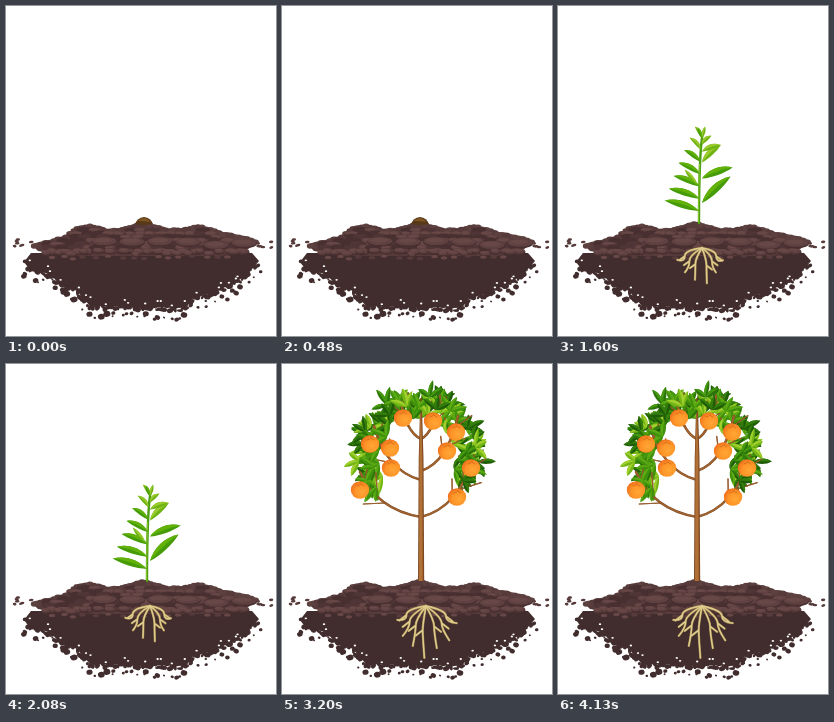
An HTML page that plays this animation: 270 by 330 pixels, repeating every 4.75 s.

```html
<!DOCTYPE html>
<html lang="en">
<head>
<meta charset="utf-8">
<title>Growing tree</title>
<style>
html, body { margin: 0; width: 100%; height: 100%; overflow: hidden; background: #fff; }
svg { display: block; width: 100%; height: 100%; }
.stage { visibility: hidden; animation: short 4750ms step-end infinite; }
#sprout { animation-delay: 800ms; }
#sapling { animation-delay: 1600ms; }
#bloom { animation-delay: 2400ms; }
#fruit { animation-name: long; animation-delay: 3200ms; }
@keyframes short { 0% { visibility: visible; } 16.8421%, 100% { visibility: hidden; } }
@keyframes long { 0% { visibility: visible; } 32.6316%, 100% { visibility: hidden; } }
</style>
</head>
<body>
<svg viewBox="0 0 270 330" preserveAspectRatio="none">
  <defs>
    <radialGradient id="peel" cx=".62" cy=".62" r=".65">
      <stop offset="0" stop-color="#ffa636"/>
      <stop offset=".6" stop-color="#fd9427"/>
      <stop offset="1" stop-color="#f0701c"/>
    </radialGradient>
  </defs>
  <g id="soil"></g>
  <g id="seed" class="stage"></g>
  <g id="sprout" class="stage"></g>
  <g id="sapling" class="stage"></g>
  <g id="bloom" class="stage"></g>
  <g id="fruit" class="stage"></g>
</svg>
<script>
let state = 11;
const rand = () => (state = state * 16807 % 2147483647) / 2147483647;
const between = (a, b) => a + (b - a) * rand();
const pick = list => list[Math.floor(rand() * list.length)];
const times = (n, make) => Array.from({ length: n }, (_, i) => make(i));
const rad = deg => deg * Math.PI / 180;
const fix = n => +n.toFixed(1);
const put = (id, ...parts) => { document.getElementById(id).innerHTML = parts.flat(3).join(''); };

const shape = (d, fill) => `<path d="${d}" fill="${fill}"/>`;
const line = (d, color, width) =>
  `<path d="${d}" fill="none" stroke="${color}" stroke-width="${width}" stroke-linecap="round"/>`;
const oval = (x, y, rx, ry, fill, turn = 0) =>
  `<ellipse rx="${fix(rx)}" ry="${fix(ry)}" fill="${fill}" transform="translate(${fix(x)} ${fix(y)}) rotate(${fix(turn)})"/>`;

// Height of a profile, given as [x, y] corners, at x
function height(profile, x) {
  const i = Math.max(1, profile.findIndex(p => p[0] >= x));
  const [[x0, y0], [x1, y1]] = [profile[i - 1], profile[i]];
  return y0 + (y1 - y0) * (x - x0) / (x1 - x0);
}

// Leaf pointing in a direction, lit on its upper half
function leaf(x, y, angle, len, width, [dark, light], bend = 0) {
  const a = fix(len * .3), b = fix(len * .7), l = fix(len), side = Math.cos(rad(angle)) < 0 ? 1 : -1;
  const curve = w => `C${a} ${fix(side * (w + bend))} ${b} ${fix(side * (w + bend))} ${l} 0`;
  const back = `C${b} ${fix(side * (bend - width))} ${a} ${fix(side * (bend - width))} 0 0`;
  const mid = `C${b} ${fix(side * bend)} ${a} ${fix(side * bend)} 0 0`;
  return `<g transform="translate(${fix(x)} ${fix(y)}) rotate(${fix(angle)})">` +
    shape('M0 0' + curve(width) + back, dark) + shape('M0 0' + curve(width) + mid, light) + '</g>';
}

function soil() {
  const deep = '#422d2e', mid = '#573b3b', light = '#684847', dim = '#482f30';
  const top = [[26, 239], [60, 230], [70, 221], [84, 219], [104, 224], [122, 221], [138, 216],
    [160, 223], [176, 223], [194, 219], [214, 226], [240, 231], [252, 236]];
  const base = [[18, 256], [24, 264], [44, 268], [56, 281], [70, 284], [84, 300], [180, 302],
    [187, 292], [208, 287], [240, 270], [253, 255]];
  const area = (profile, end, fill) => shape('M' + profile.join('L') + end + 'Z', fill);
  const out = [area(base, 'L246 247L25 247', deep)];

  for (let x = 19; x < 252; x += 2.5) {
    out.push(oval(x, height(base, x) + between(-2, 3), between(1.3, 3.6), between(1.3, 3.2), deep, between(0, 90)));
  }
  for (let x = 16; x < 253; x += 5.5) {
    const y = x < 19 ? 262 : height(base, x), r = 1 + 2.6 * rand() ** 1.5;
    out.push(oval(x + between(-3, 3), y + between(5, 13), r, r * .85, deep, between(-35, 35)));
    if (rand() < .5) out.push(oval(x + between(0, 5), y - between(2, 7), 1.2, .9, '#fff'));
  }
  for (const x of [14, 256]) {
    times(6, () => out.push(oval(x + between(-6, 12), between(233, 243), between(1.2, 2.8), 1.3, mid, between(-20, 20))));
  }

  out.push(area(top, 'L238 246L215 250L60 250L32 245', mid));
  for (let x = 28; x < 250; x += 4) {
    out.push(oval(x, height(top, x) + 1.5, between(3, 5), between(2, 3.2), pick([mid, mid, '#5d4040'])));
  }
  const clod = (x, y, rx, ry) => [oval(x, y + 1, rx, ry, dim), oval(x, y, rx - .5, ry - .5, '#5e4140'),
    oval(x - 1, y - .8, rx * .7, ry * .5, light)];
  for (let y = 224; y < 246; y += 3.5) {
    for (let x = 38 + between(0, 8); x < 240; x += between(8, 15)) {
      if (y < height(top, x) + 3) continue;
      const rx = between(5, 9), ry = between(2.2, 3.6);
      out.push(rand() < .45 ? oval(x, y, rx, ry, pick([dim, '#503536'])) : clod(x, y, rx, ry));
    }
  }
  for (let x = 98; x < 240; x += 28) out.push(clod(x, between(235, 239), 13, 4.5));
  for (let x = 40; x < 240; x += between(9, 15)) out.push(clod(x, between(244, 248), between(4, 7), 2.6));
  for (let x = 46; x < 235; x += between(8, 16)) out.push(oval(x, between(250, 253), 3.2, 1.6, pick([mid, light])));
  return out;
}

// Fan of roots that leave sideways and then dive
function roots(rx, ry, n) {
  const fan = times(n, i => {
    const a = rad(166 - 150 * i / (n - 1)), jitter = between(.85, 1.05);
    const x = 143 + rx * Math.cos(a) * jitter, y = 246 + ry * Math.sin(a) * jitter;
    const mx = 143 + (x - 143) * .6, my = 246 + (y - 246) * .4;
    const side = Math.sign(x - 143);
    return `M144 242Q${fix(mx + 2 * side)} ${fix(my - 5)} ${fix(mx + side * 2)} ${fix(my + 1)}T${fix(x)} ${fix(y)}` +
      `M${fix(mx + side * 2)} ${fix(my + 1)}l${fix(side * rx * .22)} ${fix(ry * .12)}`;
  });
  return [['#a08550', 2.3], ['#decd8d', 1.4]].map(([color, w]) => fan.map(d => line(d, color, w)));
}

const bark = '#a2642f', shade = '#7e4822';
const limb = (d, w) => line(d, shade, w) + line(d, bark, w * .65);

// Curved branch from the trunk to [ex, ey], with twigs on alternating sides
function branch(x, [y, ex, ey], width) {
  const dx = ex - x, dy = ey - y, cx = x + dx * .72, cy = y + dy * .16;
  const twigs = times(4, i => {
    const t = .48 + i * .13, u = 1 - t;
    const px = u * u * x + 2 * u * t * cx + t * t * ex, py = u * u * y + 2 * u * t * cy + t * t * ey;
    const a = Math.atan2(u * (cy - y) + t * (ey - cy), u * (cx - x) + t * (ex - cx)) + (i % 2 ? .75 : -.75);
    const len = between(.2, .3) * Math.hypot(dx, dy);
    return [px, py, px + len * Math.cos(a), py + len * Math.sin(a) - 2].map(fix);
  });
  const wood = limb(`M${x} ${y}Q${fix(cx)} ${fix(cy)} ${ex} ${ey}`, width) +
    twigs.map(([a, b, c, d]) => limb(`M${a} ${b}L${c} ${d}`, width * .5)).join('');
  return { wood, tips: [[ex, ey], ...twigs.map(t => t.slice(2))] };
}

const trunk = (x, fork, top) => shape(`M${x - 3} 217L${x - 2.3} ${fork}L${x - .7} ${top}h1.4L${x + 2.5} ${fork}L${x + 3.2} 217Z`, shade) +
  shape(`M${x - 2} 217L${x - 1.6} ${fork}L${x - .3} ${top}L${x + 1.4} ${fork}L${x + 1.7} 217Z`, '#b07036');

function flower([x, y], r) {
  const turn = between(0, 72);
  return times(5, i => {
    const a = turn + i * 72;
    return oval(x + Math.cos(rad(a)) * r * .58, y + Math.sin(rad(a)) * r * .58, r * .44, r * .3,
      pick(['#fb9e98', '#f48a87', '#fdb0a8']), a);
  }).join('') + oval(x, y, r * .26, r * .26, '#e25a5c');
}

// Small closed blossom on a dark calyx, with a young leaf
const bud = ([x, y]) => leaf(x, y + 3, between(-130, -50), 10, 2, ['#4d9c18', '#8bc72c']) +
  oval(x, y + 3, 1.7, 2, '#8c4937') + oval(x - 1.6, y, 2, 3.2, '#f48a87', -25) + oval(x + 1.6, y, 2, 3.2, '#fdb0a8', 25);

function bloom() {
  const limbs = [[178, 86, 128], [178, 194, 116], [146, 92, 97], [126, 185, 94], [117, 117, 78],
    [106, 164, 76], [96, 147, 64]].map(b => branch(141, b, 2));
  const tips = limbs.flatMap(b => b.tips);
  return [limbs.map(b => b.wood), trunk(141, 110, 72), tips.filter((_, i) => i % 5 > 2).map(bud),
    tips.filter((_, i) => i % 5 < 3).map(p => flower(p, between(6, 8)))];
}

// Sprays of leaves around the upper arc of the tree
function crown() {
  const tones = [['#1f5c08', '#347f0c'], ['#2c750a', '#459a10'], ['#3f900c', '#5cab14'], ['#74b516', '#a0d02c']];
  return times(72, i => {
    const a = 147 + 244 * (i * .618 % 1), r = Math.sqrt(between(.26, .74));
    const x = 136 + 69 * r * Math.cos(rad(a)), y = 94 + 74 * r * Math.sin(rad(a));
    const tone = pick(tones);
    return [-58, 48, -8].map(turn =>
      leaf(x, y, a + turn + between(-16, 16), between(13, 19), between(2.8, 3.8), tone, .8));
  });
}

const orange = ([x, y]) => oval(x, y, 9.2, 8.8, 'url(#peel)') +
  line(`M${x + 1} ${y - 6}q1 2 3 2m-3-2q-2 2-4 2`, '#cf651b', .7);

function fruit() {
  const limbs = [[153, 78, 108], [153, 192, 92], [116, 92, 62], [107, 176, 52], [75, 118, 34],
    [75, 158, 32]].map(b => branch(139, b, 2.5));
  const oranges = [[88, 80], [78, 126], [109, 104], [108, 84], [121, 54], [151, 57], [174, 68],
    [165, 87], [189, 104], [175, 133]];
  return [crown(), limbs.map(b => b.wood), trunk(139, 95, 34), crown().slice(0, 26), oranges.map(orange)];
}

function sapling() {
  const low = ['#459c08', '#62b20a'], high = ['#6fb313', '#9ccb30'];
  return [
    line('M141 217Q141 181 142 158T145 126', '#4a9c10', 2.4), line('M140.6 216Q140.6 181 141.5 158', '#8ac62c', 1),
    times(7, i => leaf(141 + i * .3, 205 - 12.3 * i, 197 + i * i * 1.2, 36 - 4 * i, 4.6 - i * .35, i < 5 ? low : high, 2)),
    times(5, i => leaf(144, 125 + 72 * .66 ** i, i % 2 ? -20 : -43, 39 - 6.5 * i, 5.3 - i * .6, i < 2 ? low : high, 2)),
    leaf(139, 178, -130, 19, 2.6, high), leaf(144, 132, -75, 12, 2.2, high), leaf(144, 132, -112, 11, 2, low)
  ];
}

put('soil', soil());
put('seed', shape('M129 218Q131 212 138 211Q145 212 147 218Q138 220 129 218Z', '#573819'),
  shape('M132 215Q134 212 139 212Q143 213 144 216Q138 215 132 215Z', '#7c5521'));

const fresh = ['#48a808', '#79cc18'];
put('sprout', shape('M130 216Q131 211 137 211Q142 212 144 216Q137 218 130 216Z', '#8a5428'),
  shape('M132 214Q134 211 138 212L142 215Q137 214 132 214Z', '#d18b45'),
  line('M144 216Q144 208 141 200', '#62b51b', 1.8),
  leaf(141, 203, -115, 14, 3, fresh), leaf(141, 202, -53, 15, 3.2, fresh), leaf(142, 207, -120, 6, 1.3, fresh));

put('sapling', roots(25, 33, 6), sapling());
put('bloom', roots(32, 44, 7), bloom());
put('fruit', roots(32, 46, 7), fruit());
</script>
</body>
</html>
```
